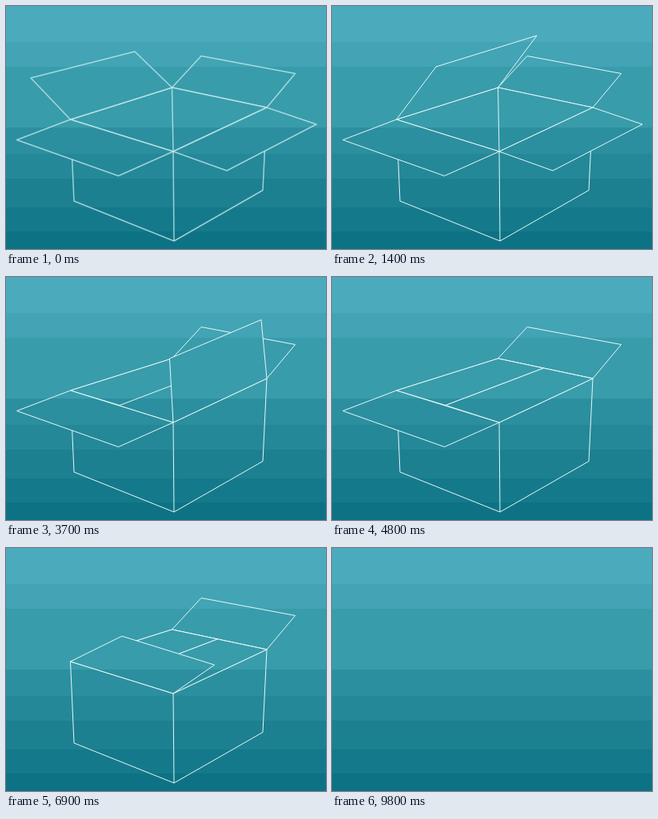
These frames come from a looping animation (400x304 px, 9.9 s). An HTML page with a canvas:

```html
<!DOCTYPE html>
<html lang="en">
<head>
<meta charset="utf-8">
<title>Folding box</title>
<style>
  html, body { margin: 0; width: 100%; height: 100%; overflow: hidden; }
  canvas { display: block; width: 400px; height: 304px; }
</style>
</head>
<body>
<canvas id="stage" width="400" height="304"></canvas>
<script>
const ctx = document.getElementById('stage').getContext('2d');
const LOOP = 9900, STEP = 100, HIDE_AT = 9800;

// Horizontal bands: bottom edge and colour
const bands = [
  [45, '#4caabd'], [76, '#42a4b4'], [152, '#389cab'], [185, '#2b8f9f'],
  [216, '#248899'], [252, '#1c8091'], [282, '#147a8b'], [304, '#0d7384']
];
const backdrop = ctx.createLinearGradient(0, 0, 0, 304);
let bandTop = 0;
for (const [bandBottom, color] of bands) {
  backdrop.addColorStop(bandTop / 304, color);
  backdrop.addColorStop(bandBottom / 304, color);
  bandTop = bandBottom;
}

// Rim corners and floor corners
const left = [80.5, 142], back = [207.5, 102], right = [326, 127], front = [209, 182];
const floorLeft = [85, 244], floorFront = [210, 294], floorRight = [321, 230.5];

// Each flap turns about a rim edge; its two free corners pass three poses
const backLeft = {
  hinge: [left, back], start: 0, mid: 1400, end: 2100, angle: 158,
  open: [[31, 90], [161, 57]],
  raised: [[130, 76], [256, 37]],
  closed: [[142, 160.5], [264.5, 114]]
};
const frontRight = {
  hinge: [front, right], start: 2500, mid: 3700, end: 4550, angle: 184,
  open: [[276, 206], [388, 148]],
  raised: [[204.5, 102], [319, 53.5]],
  closed: [[142, 160.5], [264.5, 114]]
};
const frontLeft = {
  hinge: [left, front], start: 5050, mid: 6000, end: 7000, angle: 185,
  open: [[13.5, 167.5], [140.5, 212.5]],
  raised: [[61, 76.5], [192.5, 117]],
  closed: [[148, 121], [262, 157]]
};
const backRight = {
  hinge: [back, right], start: 7250, mid: 7900, end: 9550, angle: 150,
  open: [[244, 62.5], [361.5, 84.5]],
  raised: [[217.5, 37], [334.5, 58.5]],
  closed: [[148, 121], [262, 157]]
};

// Weights of an elliptical arc through poses at the given angles
function arcWeights(theta, angles) {
  return angles.map((a, i) => angles.reduce((w, b, j) =>
    i === j ? w : w * Math.sin((theta - b) / 2) / Math.sin((a - b) / 2), 1));
}

function flapCorners(flap, time) {
  const angleAt = t => {
    const progress = (t - flap.start) / (flap.end - flap.start);
    return flap.angle * Math.PI / 180 * (1 - Math.min(1, Math.max(0, progress)));
  };
  const weights = arcWeights(angleAt(time), [flap.start, flap.mid, flap.end].map(angleAt));
  const poses = [flap.open, flap.raised, flap.closed];
  return [0, 1].map(corner => [0, 1].map(axis =>
    poses.reduce((sum, pose, i) => sum + weights[i] * pose[corner][axis], 0)));
}

function trace(points, solid) {
  ctx.beginPath();
  points.forEach(p => ctx.lineTo(...p));
  if (solid) {
    ctx.closePath();
    ctx.fill();
  }
  ctx.stroke();
}

function drawFlap(flap, time) {
  const [a, b] = flapCorners(flap, time);
  trace([flap.hinge[0], a, b, flap.hinge[1]], true);
}

function draw(time) {
  ctx.fillStyle = backdrop;
  ctx.fillRect(0, 0, 400, 304);
  if (time >= HIDE_AT) return;

  const appearing = time < STEP;
  ctx.strokeStyle = appearing ? 'rgba(205,240,242,.72)' : '#e6f7f8';
  ctx.lineWidth = appearing ? 1.5 : 1;
  ctx.lineJoin = 'round';

  const lidOnTop = time > backRight.start;
  if (!lidOnTop) drawFlap(backRight, time);
  trace([left, back, right, front], true);
  trace([back, front]);
  trace([left, floorLeft, floorFront, floorRight, right]);
  trace([front, floorFront]);
  [backLeft, frontRight, frontLeft].forEach(flap => drawFlap(flap, time));
  if (lidOnTop) drawFlap(backRight, time);
}

function tick() {
  draw(Math.floor(performance.now() % LOOP / STEP) * STEP);
  requestAnimationFrame(tick);
}
tick();
</script>
</body>
</html>
```
